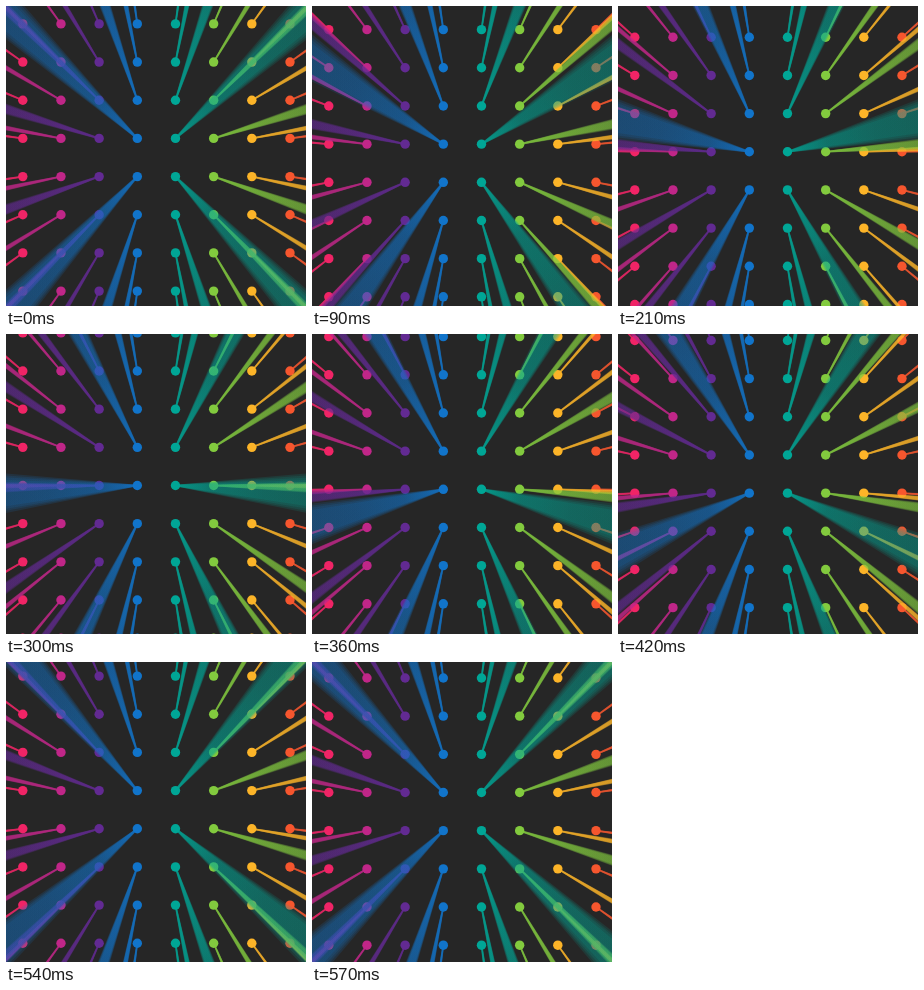
Recreate the animation shown at these times as an HTML page with a canvas. Size 300x300 px, loop 600 ms.

```html
<!DOCTYPE html>
<html lang="en">
<head>
<meta charset="utf-8">
<title>Dots and beams</title>
<style>
  html, body { margin: 0; width: 100%; height: 100%; overflow: hidden; background: #262626; }
  canvas { display: block; width: 300px; height: 300px; }
</style>
</head>
<body>
<canvas id="stage" width="300" height="300"></canvas>
<script>
const ctx = document.getElementById('stage').getContext('2d');
const SIZE = 300, LOOP = 600, STEP = 30;
const GAP = 38.17, LEFT = 16.8, TOP = 17.9, RADIUS = 4.7;
const CENTER = 150.4;
const SPREAD = 4.9, END_WIDTH = 50, START_WIDTH = 1.5;
const LAYERS = [1.12, 1, 0.88, 0.74];
const COLORS = [
  [240, 36, 102], [192, 38, 136], [98, 42, 146], [17, 116, 202],
  [0, 166, 150], [130, 202, 62], [252, 180, 40], [246, 86, 46]
];

const rgba = (c, a) => `rgba(${c[0]},${c[1]},${c[2]},${a})`;

// alpha of one layer so that the whole stack reaches the wanted total
const layerAlpha = total => 1 - Math.pow(1 - total, 1 / LAYERS.length);

const FADE = [[0, 0.9], [0.08, 0.76], [0.2, 0.6], [0.45, 0.5], [1, 0.4]]
  .map(([at, total]) => [at, layerAlpha(total)]);

function beam(dot) {
  const { x, y, dist, color } = dot;
  const ux = (x - CENTER) / dist, uy = (y - CENTER) / dist;
  const len = END_WIDTH * dist / SPREAD;
  const ex = x + ux * len, ey = y + uy * len;
  const fill = ctx.createLinearGradient(x, y, ex, ey);
  FADE.forEach(([at, a]) => fill.addColorStop(at, rgba(color, a)));
  ctx.fillStyle = fill;
  for (const k of LAYERS) {
    const a = START_WIDTH * k / 2;
    const b = (START_WIDTH + END_WIDTH) * k / 2;
    ctx.beginPath();
    ctx.moveTo(x - uy * a, y + ux * a);
    ctx.lineTo(ex - uy * b, ey + ux * b);
    ctx.lineTo(ex + uy * b, ey - ux * b);
    ctx.lineTo(x + uy * a, y - ux * a);
    ctx.fill();
  }
}

function disc(dot) {
  ctx.fillStyle = rgba(dot.color, 1);
  ctx.beginPath();
  ctx.arc(dot.x, dot.y, RADIUS, 0, Math.PI * 2);
  ctx.fill();
}

function draw(ms) {
  const t = Math.floor((ms % LOOP) / STEP) * STEP / LOOP;
  const dots = [];
  COLORS.forEach((color, col) => {
    for (let row = -2; row < 8; row++) {
      const x = LEFT + col * GAP, y = TOP + (row + t) * GAP;
      dots.push({ x, y, color, dist: Math.hypot(x - CENTER, y - CENTER) });
    }
  });
  dots.sort((a, b) => b.dist - a.dist);

  ctx.fillStyle = '#262626';
  ctx.fillRect(0, 0, SIZE, SIZE);
  for (const dot of dots) {
    beam(dot);
    disc(dot);
  }
}

const start = performance.now();
function tick() {
  draw(performance.now() - start);
  requestAnimationFrame(tick);
}
tick();
</script>
</body>
</html>
```
